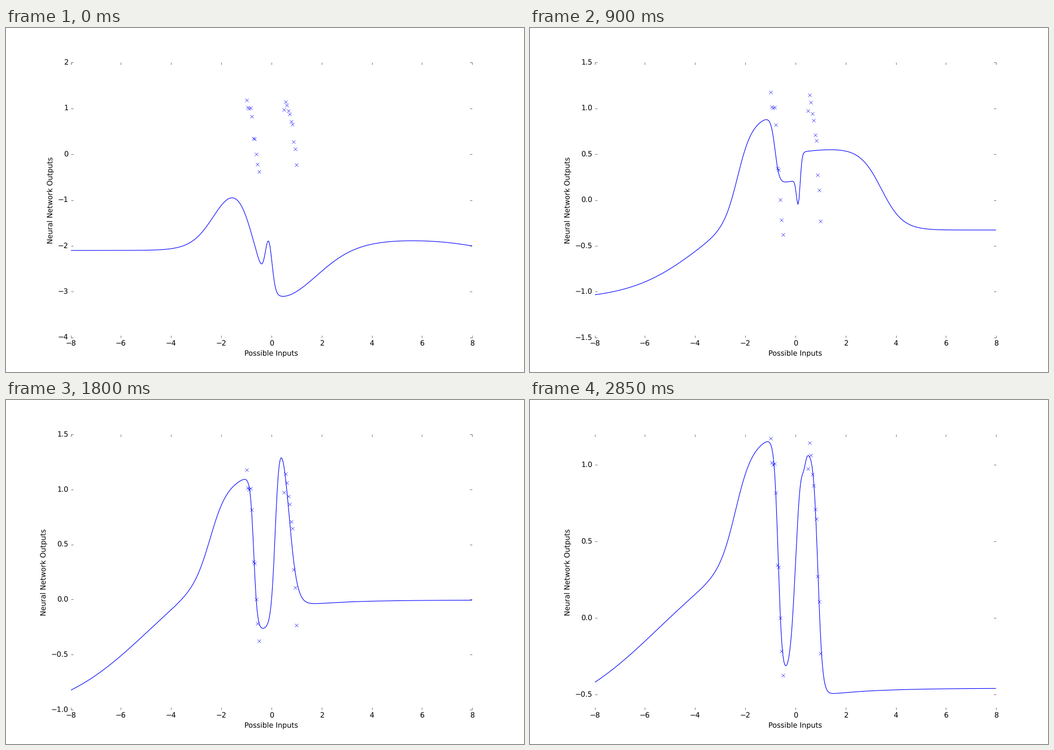
A matplotlib script for the animation above (3 s loop, 917 by 611 pixels).

```python
import numpy as np
import matplotlib.pyplot as plt
from matplotlib.animation import FuncAnimation
from matplotlib.ticker import MultipleLocator

W, H, DPI = 917, 611, 72  # at 72 dpi one point is one pixel
FRAMES, INTERVAL = 20, 150
PT = W / 12 / 72

plt.style.use("classic")
plt.rcParams.update({
    "font.family": "DejaVu Sans",
    "font.size": 12 * PT,
    "text.hinting": "none",
    "figure.facecolor": "white",
    "savefig.facecolor": "white",
    "savefig.dpi": "figure",
    "lines.linewidth": PT,
    "lines.markersize": 6 * PT,
    "lines.markeredgewidth": 0.5 * PT,
    "axes.labelpad": 5 * PT,
})
for axis in ("xtick", "ytick"):
    plt.rcParams.update({
        f"{axis}.major.size": 4 * PT,
        f"{axis}.major.width": 0.5 * PT,
        f"{axis}.major.pad": 4 * PT,
    })


def toy_data():
    """Noisy cosine with a gap in the middle, inputs scaled to -1..1."""
    x = np.r_[np.linspace(0, 2, 10), np.linspace(6, 8, 10)]
    y = np.cos(x) + 0.1 * np.random.RandomState(0).randn(x.size)
    return (x - 4) / 4, y


# The curve is a base level, five soft steps and one bump; each unit is
# (height, centre, width).
def weights(base, ramp, hump, fall, rise, drop, bump):
    return base, np.array([ramp, hump, fall, rise, drop, bump])


KEYS = {
    0: weights(-2.1, (0, -8, 1.5), (1.7, -2.21, .47), (-3.1, -.7, .35),
               (1.65, 1.75, .85), (-.4, 8.5, 1), (.97, -.11, .19)),
    2: weights(-1.41, (.28, -8, 1.5), (1.53, -1.38, .185), (-.2, -.65, .08),
               (-.06, .2, .06), (-.05, 8, .7), (.52, .06, .165)),
    6: weights(-1.087, (1.13, -3.8, 1.4), (1.01, -2.3, .27), (-.77, -.815, .085),
               (.3, .2, .04), (-.91, 3.42, .43), (-.29, .11, .1)),
    8: weights(-1.035, (1.18, -4.3, 1.3), (.87, -2.43, .3), (-1.05, -.74, .07),
               (.71, .18, .045), (-1.035, 2.77, .38), (0, .1, .1)),
    12: weights(-1.065, (1.52, -5, 1.8), (.81, -2.43, .32), (-1.43, -.705, .07),
                (1.85, .15, .085), (-1.69, .7, .163), (0, .1, .1)),
    16: weights(-.833, (1.37, -5.5, 2), (.755, -2.4, .32), (-1.61, -.69, .08),
                (1.65, .16, .15), (-1.68, .87, .11), (0, .33, .1)),
    19: weights(-.7, (1.25, -5.5, 2), (.75, -2.38, .32), (-1.6, -.69, .08),
                (1.46, 0, .11), (-1.62, .895, .09), (-.06, .33, .1)),
}


def weights_at(n):
    a = max(k for k in KEYS if k <= n)
    b = min(k for k in KEYS if k >= n)
    w = (n - a) / max(b - a, 1)
    return [(1 - w) * p + w * q for p, q in zip(KEYS[a], KEYS[b])]


def swing(n):
    """Gain and shift while the optimiser overshoots and settles."""
    if n == 1:
        return 2, 4.6
    if 2 < n < 5:
        return 1 + 0.22 * np.sin(np.pi * (n - 2) / 3), 0
    return 1, 0


def network(n, x):
    base, units = weights_at(n)
    height, centre, width = units.T[:, :, None]
    u = (x - centre) / width
    steps = height[:-1] * (1 + np.tanh(u[:-1] / 2)) / 2
    bump = height[-1] * np.exp(-u[-1] ** 2)
    gain, shift = swing(n)
    return gain * (base + steps.sum(axis=0) + bump) + shift


def y_axis(n):
    """Lower limit, upper limit and tick step."""
    if n == 0:
        return -4, 2, 1
    if n == 1:
        return -1, 5, 1
    if n < 8:
        return -1.5, 1.5, 0.5
    if n < 15:
        return -1, 1.5, 0.5
    return -0.6, 1.2, 0.5


fig = plt.figure(figsize=(W / DPI, H / DPI), dpi=DPI)
ax = fig.add_axes([0.125, 0.1, 0.775, 0.8], frameon=False)
ax.plot(*toy_data(), "bx", snap=False)
grid = np.linspace(-8, 8, 400)
line, = ax.plot(grid, np.zeros_like(grid), "b-")
ax.set_xlim(-8, 8)
ax.xaxis.set_major_locator(MultipleLocator(2))
ax.set_xlabel("Possible Inputs")
ax.set_ylabel("Neural Network Outputs")


def draw(n):
    low, high, step = y_axis(n)
    ax.set_ylim(low, high)
    ax.yaxis.set_major_locator(MultipleLocator(step))
    line.set_ydata(network(n, grid))
    return line,


anim = FuncAnimation(fig, draw, frames=FRAMES, init_func=lambda: draw(0),
                     interval=INTERVAL, repeat=True, repeat_delay=0, blit=False)
plt.show()
```
